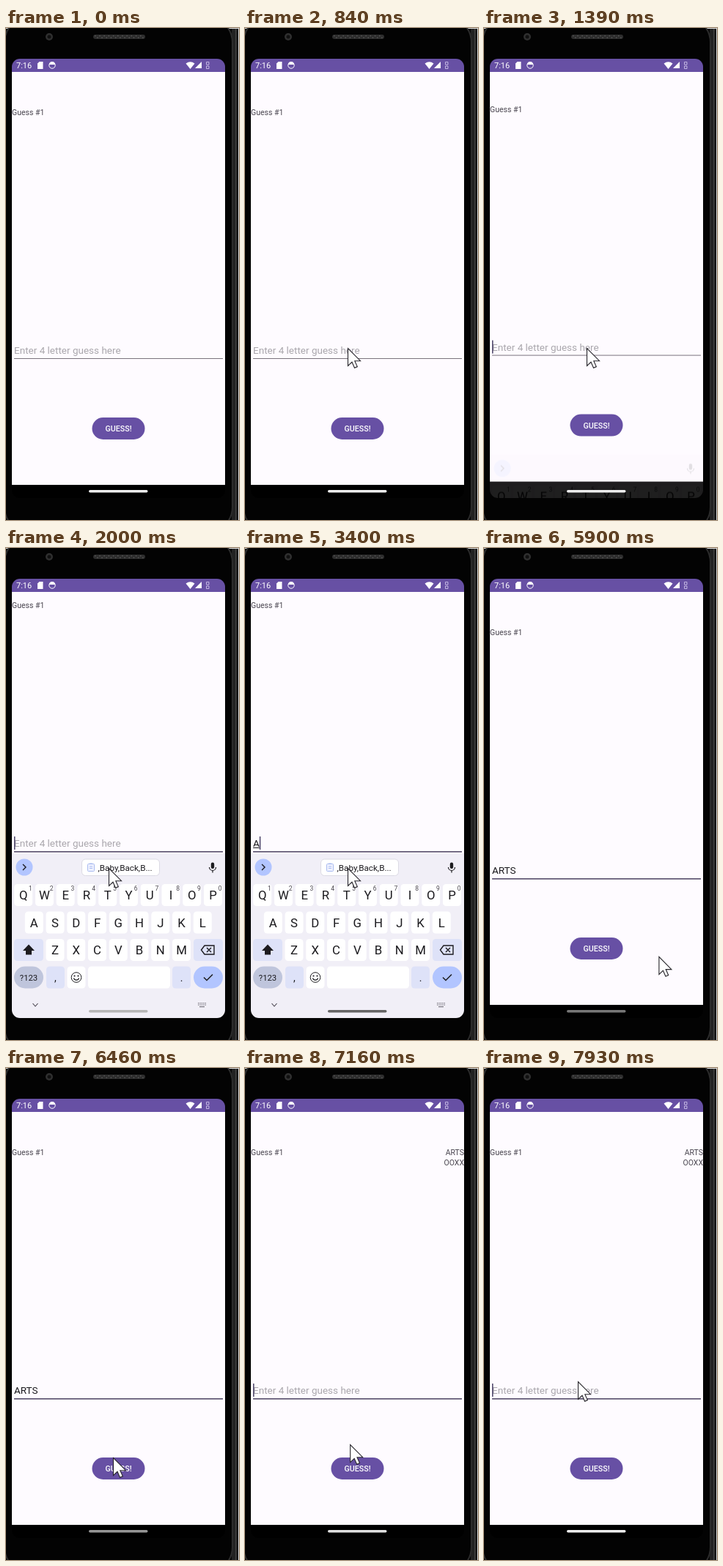
Write an HTML page with a canvas that moves like this. It is 318 px wide and 672 px high and loops after 8000 ms.

```html
<!DOCTYPE html>
<html lang="en">
<head>
<meta charset="utf-8">
<title>Word guess</title>
<style>
html, body { margin: 0; width: 318px; height: 672px; overflow: hidden; background: #000; }
canvas { display: block; width: 318px; height: 672px; }
</style>
</head>
<body>
<canvas></canvas>
<script>
const LOOP = 8000, STEP = 200 / 3;
const PURPLE = '#6750a4', INK = '#1c1b1f', PAPER = '#fefbff', BLUE = '#b2c5ff', PALE = '#dee2f8';
const canvas = document.querySelector('canvas');
const scale = window.devicePixelRatio || 1;
canvas.width = 318 * scale;
canvas.height = 672 * scale;
const layer = canvas.cloneNode();
const stage = canvas.getContext('2d'), keyLayer = layer.getContext('2d');
let ctx = stage;

// Each row: time, then values, eased between rows.
const pointer = [[133, 256, 655], [600, 140, 437], [4740, 140, 437], [5133, 278, 565], [5333, 278, 569],
  [5667, 278, 569], [6400, 146, 532], [7000, 146, 532], [7800, 128, 417], [7933, 128, 428]];
const keyboard = [[1333, 0], [1400, .12], [1467, .55], [1533, .88], [1600, 1],
  [5400, 1], [5467, .88], [5600, .4], [5733, 0]];
const pillShade = [[1390, 238], [1580, 205], [1850, 182], [2200, 182], [2280, 102], [5400, 98],
  [6110, 125], [6460, 150], [7400, 238]];
const caretOn = [[900, 1500], [2000, 2910], [3400, 4800], [6740, 7240], [7740, LOOP]];
const typedAt = [2210, 3600, 4070, 4270];
const underlinedAt = [2420, 3870, 4270, 4540];
const RESULT = 6740;

function track(rows, t) {
  const next = rows.findIndex(row => row[0] > t);
  if (next === 0) return rows[0].slice(1);
  if (next < 0) return rows[rows.length - 1].slice(1);
  const a = rows[next - 1], b = rows[next];
  const u = (t - a[0]) / (b[0] - a[0]), k = u * u * (3 - 2 * u);
  return a.slice(1).map((v, i) => v + (b[i + 1] - v) * k);
}

function box(x, y, w, h, r, fill, stroke) {
  ctx.beginPath();
  ctx.roundRect(x, y, w, h, r);
  paint(fill, stroke);
}

function circle(x, y, r, fill, stroke) {
  ctx.beginPath();
  ctx.arc(x, y, r, 0, 7);
  paint(fill, stroke);
}

function paint(fill, stroke, width = 1) {
  ctx.lineWidth = width;
  if (fill) { ctx.fillStyle = fill; ctx.fill(); }
  if (stroke) { ctx.strokeStyle = stroke; ctx.stroke(); }
}

function shape(x, y, d, fill, stroke, width) {
  const path = new Path2D(d);
  ctx.save();
  ctx.translate(x, y);
  ctx.lineWidth = width || 1;
  if (fill) { ctx.fillStyle = fill; ctx.fill(path); }
  if (stroke) { ctx.strokeStyle = stroke; ctx.stroke(path); }
  ctx.restore();
}

function font(size, weight = 400) {
  ctx.font = `${weight} ${size}px Roboto, sans-serif`;
}

function text(str, x, y, color = INK, align = 'left') {
  ctx.fillStyle = color;
  ctx.textAlign = align;
  ctx.fillText(str, x, y);
}

function drawPhone() {
  ctx.fillStyle = '#000';
  ctx.fillRect(0, 0, 318, 672);
  ctx.fillStyle = '#222';
  ctx.fillRect(308, 0, 8, 672);
  ctx.fillStyle = '#444';
  ctx.fillRect(313, 0, 1, 672);
  ctx.fillStyle = '#ddd';
  ctx.fillRect(317, 0, 1, 672);
  ctx.fillRect(0, 0, 318, 1);
  ctx.beginPath();
  ctx.roundRect(-2, -16, 311, 706, 36);
  paint('#030303', '#2c2c2c', 2);
  circle(59, 12, 5, '#303030');
  circle(59, 12, 2.5, '#111');
  box(119, 9, 71, 6, 3, '#2d2d2d');
  ctx.fillStyle = '#565656';
  for (let i = 0; i < 22; i++) ctx.fillRect(121 + i * 3.1, 10 + i % 2 * 2.5, 1.5, 1.5);
}

function drawStatusBar() {
  ctx.fillStyle = PURPLE;
  ctx.fillRect(8, 42, 291, 18);
  font(11);
  text('7:16', 14, 55, '#fff');
  shape(43, 46, 'M2.5 0H7.5V10H0V2.5Z', '#fff');
  circle(63, 51, 4.2, null, '#fff');
  shape(63, 51, 'M-4 -1A4 4 0 0 1 4 -1Z', '#fff');
  shape(251.5, 47, 'M-6 1.5Q0 -3 6 1.5L0 9Z', '#fff');
  shape(258, 46, 'M9 0V9H0Z', '#fff');
  shape(273, 46, 'M.5 .5H4V4H.5ZM.5 6H4V9.5H.5Z', null, '#d8cff0', .8);
}

function drawField(t) {
  const focused = t >= 1450;
  const count = t < RESULT ? typedAt.filter(at => t >= at).length : 0;
  const word = 'ARTS'.slice(0, count);
  font(13.5);
  if (count) text(word, 11, 445);
  else text('Enter 4 letter guess here', 11, 445, '#aaa7ad');
  ctx.fillStyle = INK;
  if (t < 5400) {
    const done = underlinedAt.filter(at => t >= at).length;
    ctx.fillRect(11, 446, ctx.measureText('ARTS'.slice(0, done)).width, 1);
  }
  if (caretOn.some(([from, to]) => t >= from && t < to)) {
    ctx.fillStyle = '#4a4268';
    ctx.fillRect(11 + ctx.measureText(word).width, 431, 1.5, 18);
  }
  ctx.fillStyle = focused ? '#5f5672' : '#7a737d';
  ctx.fillRect(11, 451, 285, focused ? 1.7 : 1);
}

function drawApp(t, pan) {
  ctx.fillStyle = PAPER;
  ctx.fillRect(8, 60, 291, 564 - pan);
  ctx.save();
  ctx.translate(0, -pan);
  font(10.5);
  text('Guess #1', 8, 119, '#49454f');
  if (t >= RESULT) {
    text('ARTS', 299, 119, '#49454f', 'right');
    text('OOXX', 299, 133, '#49454f', 'right');
  }
  drawField(t);
  box(117.5, 532, 72, 30, 15, PURPLE);
  if (t > 6590 && t < 6950) box(117.5, 532, 72, 30, 15, `rgba(255,255,255,${.18 * (6950 - t) / 360})`);
  font(10.7, 500);
  text('GUESS!', 153.5, 551, '#fff', 'center');
  ctx.restore();
}

function drawKeyRow(letters, x, y, digits) {
  [...letters].forEach((letter, i) => {
    const cx = x + i * 28.75;
    box(cx - 12.5, y, 25, 30, 4.5, '#fff');
    font(16.8);
    text(letter, cx, y + 21, INK, 'center');
    if (digits) {
      font(8.5);
      text((i + 1) % 10, cx + 9.8, y + 8.5, '#49454f', 'center');
    }
  });
}

function drawToolbar(showClip) {
  circle(25, 436, 11.5, BLUE);
  shape(25, 436, 'M-2 -4L2 0L-2 4', null, INK, 1.4);
  box(279.8, 429.5, 4.4, 8.5, 2.2, INK);
  shape(282, 436, 'M-4.5 0A4.5 4.5 0 0 0 4.5 0M0 4.5V7.5', null, INK, 1.2);
  if (!showClip) return;
  box(103.5, 425, 106, 22.5, 5, '#fff', '#dcdbe4');
  box(111.5, 431.5, 9, 10, 1, '#eef1ff', '#a9bbef');
  shape(113, 430, 'M1 1H5M1 5H5M1 7.5H5', null, '#a9bbef');
  font(11.7);
  text(',Baby,Back,B...', 125.5, 440.5);
}

function drawBottomKeys() {
  box(11, 571.5, 40, 30, 15, '#bfc5dc');
  font(11.3);
  text('?123', 31, 590.5, INK, 'center');
  for (const [x, w, fill] of [[55, 25, PALE], [83.5, 25, '#fff'], [112, 112, '#fff'], [227, 25, PALE]])
    box(x, 571.5, w, 30, 4.5, fill);
  font(14);
  text(',', 67.5, 592, INK, 'center');
  text('.', 239.5, 592, INK, 'center');
  circle(96, 586.5, 6.8, null, INK);
  circle(93.5, 584.5, 1.1, INK);
  circle(98.5, 584.5, 1.1, INK);
  shape(96, 587.5, 'M-3.6 0A3.8 3.8 0 0 0 3.6 0', null, INK, 1.2);
  box(256, 571.5, 40, 30, 15, BLUE);
  shape(276, 586.5, 'M-6 0L-2 4L6 -4', null, INK, 1.5);

  shape(40, 624, 'M-3.5 -2L0 2L3.5 -2', null, '#49454f', 1.1);
  ctx.fillStyle = '#77747e';
  for (let i = 0; i < 10; i++) ctx.fillRect(262 + i % 5 * 2.4, i < 5 ? 621 : 623.4, 1.3, 1.3);
  ctx.fillRect(264, 626, 7, 1.2);
}

function drawKeyboard(open) {
  if (!open) return;
  ctx = keyLayer;
  ctx.setTransform(scale, 0, 0, scale, 0, 0);
  ctx.clearRect(0, 0, 318, 672);
  ctx.fillStyle = '#f1eff7';
  ctx.fillRect(8, 417, 291, 226);
  drawToolbar(open > .5);
  drawKeyRow('QWERTYUIOP', 23.7, 459, true);
  drawKeyRow('ASDFGHJKL', 38.3, 496.5);
  drawKeyRow('ZXCVBNM', 67, 534);
  box(11, 534, 40, 30, 4.5, PALE);
  shape(31, 549, 'M0 -7.5L8 1H4V6.5H-4V1H-8Z', INK);
  box(256, 534, 40, 30, 4.5, PALE);
  shape(275.5, 549, 'M-9 0L-4.5 -6H8.5V6H-4.5ZM-1.5 -3L4.5 3M4.5 -3L-1.5 3', null, INK, 1.4);
  drawBottomKeys();

  ctx = stage;
  ctx.globalAlpha = open;
  ctx.drawImage(layer, 0, 188 * (1 - open), 318, 672);
  ctx.globalAlpha = 1;
}

function drawPointer(t, moment) {
  if (t < 100) return;
  const [x, y] = track(pointer, moment);
  shape(x + .5, y + .5, 'M0 0V24L5.5 18.8L9 26.7L12.8 25.1L9.3 17.2H17Z', '#fff', '#26242a', 1.1);
}

function draw(t) {
  const moment = Math.floor((t + 40) / STEP) * STEP;
  const [open] = track(keyboard, moment);
  ctx.setTransform(scale, 0, 0, scale, 0, 0);
  drawPhone();
  ctx.save();
  ctx.beginPath();
  ctx.roundRect(8, 42, 291, 600, 11);
  ctx.clip();
  ctx.fillStyle = '#000';
  ctx.fillRect(8, 42, 291, 600);
  drawApp(t, 37 * open);
  drawStatusBar();
  drawKeyboard(open);
  const shade = Math.round(track(pillShade, t)[0]);
  box(113, 631, 80.5, 3.5, 1.75, `rgb(${shade},${shade},${shade})`);
  ctx.restore();
  drawPointer(t, moment);
}

const start = performance.now();
function tick() {
  draw((performance.now() - start) % LOOP);
  requestAnimationFrame(tick);
}
tick();
</script>
</body>
</html>
```
